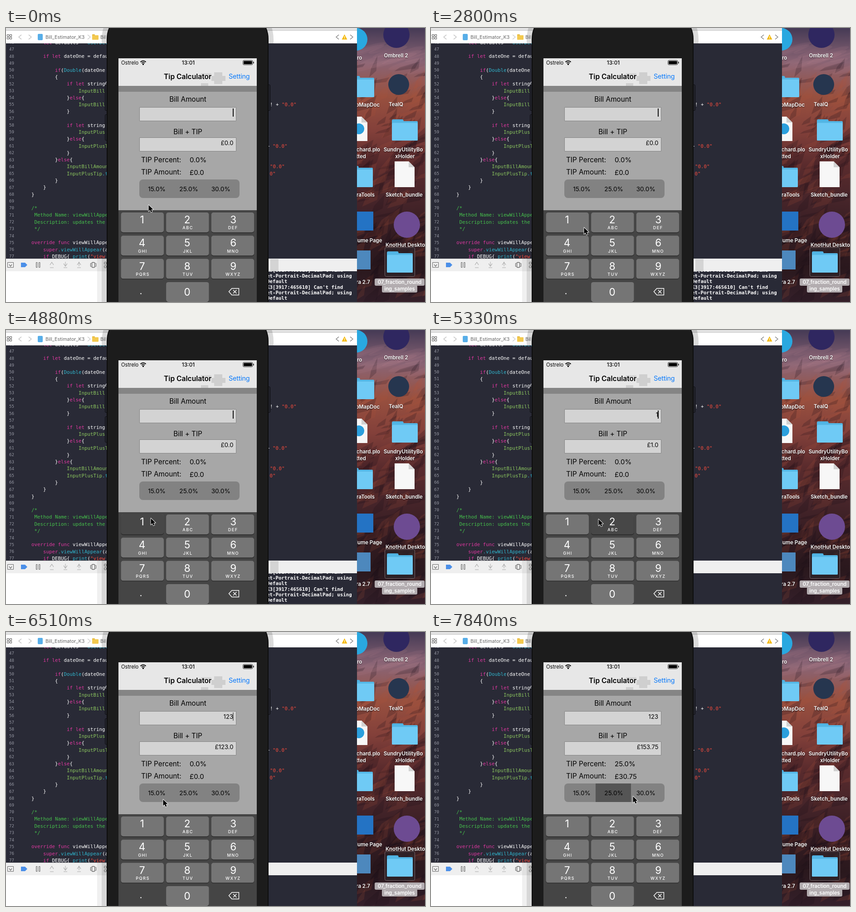
Write an HTML page with a canvas that moves like this. It is 924 px wide and 606 px high and loops after 7.99 s.

```html
<!DOCTYPE html>
<html lang="en">
<head>
<meta charset="utf-8">
<title>Tip calculator demo</title>
<style>
html, body { margin: 0; width: 100%; height: 100%; overflow: hidden; background: #292a36; }
canvas { display: block; width: 924px; height: 606px; }
</style>
</head>
<body>
<canvas id="stage" width="924" height="606"></canvas>
<script>
const W = 924, H = 606, LOOP = 7990, STEPS = 54;
const SANS = 'Inter, "Liberation Sans", sans-serif';
const MONO = '"DejaVu Sans Mono", monospace';
const stage = document.getElementById('stage').getContext('2d');
const backdrop = document.createElement('canvas');
backdrop.width = W;
backdrop.height = H;
let c = backdrop.getContext('2d');

let seed = 11;
const random = () => (seed = seed * 16807 % 2147483647) / 2147483647;

function box(x, y, w, h, fill, r = 0) {
  c.fillStyle = fill;
  c.beginPath();
  c.roundRect(x, y, w, h, r);
  c.fill();
}

function frame(x, y, w, h, color, width = 1, r = 0) {
  c.strokeStyle = color;
  c.lineWidth = width;
  c.beginPath();
  c.roundRect(x, y, w, h, r);
  c.stroke();
}

function disc(x, y, r, fill) {
  c.fillStyle = fill;
  c.beginPath();
  c.arc(x, y, r, 0, 7);
  c.fill();
}

function trace(points, closed) {
  c.beginPath();
  for (let i = 0; i < points.length; i += 2) c.lineTo(points[i], points[i + 1]);
  if (closed) c.closePath();
}

function poly(points, fill) {
  trace(points, true);
  c.fillStyle = fill;
  c.fill();
}

function line(points, color, width = 1, closed = false) {
  trace(points, closed);
  c.strokeStyle = color;
  c.lineWidth = width;
  c.stroke();
}

// y is the middle of the capital letters
function text(s, x, y, size, color = '#000', o = {}) {
  c.font = `${o.weight || 400} ${size}px ${o.font || SANS}`;
  c.letterSpacing = (o.gap || 0) + 'px';
  c.textAlign = o.align || 'left';
  c.fillStyle = color;
  c.fillText(s, x, y + size * 0.363);
}

function within(x, y, w, h, draw) {
  c.save();
  c.beginPath();
  c.rect(x, y, w, h);
  c.clip();
  draw();
  c.restore();
}

// ---------- code editor ----------
const PINK = '#de38a0', GREEN = '#8cc75f', RED = '#f64c3e', TEAL = '#30b4cc';
const rules = [
  [/^(if|let|else|override|func|super)\b/, PINK],
  [/^Input\w*/, GREEN],
  [/^"[^"]*"?/, RED],
  [/^(Double|print|UserDefaults)\b/, TEAL],
  [/^\.(viewWillAppear|t)\b/, TEAL],
  [/^\w+/, '#fff'],
  [/^\W/, '#fff']
];
const source = `    let defaults = UserDefaults

    if let dateOne = defaults

        if(Double(dateOne
        {
            if let stringOne
                InputBillAmount
            }else{
                InputBillAmount
            }

            if let stringTwo
                InputPlusTip
            }else{
                InputPlusTip
            }
        }else{
            InputBillAmount
            InputPlusTip.t
        }
    }
}

/*
 Method Name: viewWillAppear
 Description: updates the
 */

override func viewWillAppear
    super.viewWillAppear(a
    if DEBUG{ print("view`.split('\n');

const lineY = i => 31.7 + i * 15.27;

function code(s, x, y) {
  while (s) {
    const [re, color] = rules.find(r => r[0].test(s));
    const part = s.match(re)[0];
    text(part, x, y, 10.8, color, { font: MONO });
    x += part.length * 6.5;
    s = s.slice(part.length);
  }
}

function chevron(x, y, dx, dy, color, size = 5) {
  const sx = dy ? size : 0, sy = dx ? size : 0;
  line([x - sx - dx * 3, y - sy - dy * 3, x + dx * 3, y + dy * 3,
    x + sx - dx * 3, y + sy - dy * 3], color, 1.2);
}

function pathBar() {
  box(0, 0, 774, 6, '#e3e3e3');
  box(0, 5, 774, 1, '#c6c6c6');
  box(0, 6, 774, 28, '#fff');
  for (let n = 0; n < 4; n++) frame(2.5 + n % 2 * 6, 14.5 + (n >> 1) * 6, 4, 4, '#555');
  chevron(31, 20, -1, 0, '#bbb');
  chevron(53, 20, 1, 0, '#bbb');
  box(70, 13, 11, 14, '#58aee8', 2);
  text('Bill_Estimator_K3', 87, 20, 10.7, '#666');
  chevron(183, 20, 1, 0, '#c8c8c8');
  box(190, 14, 6, 4, '#e5b93c', 1);
  box(190, 16, 14, 10, '#f3c94f', 1);
  text('Bil', 208, 20, 10.7, '#666');
  chevron(731, 20, -1, 0, '#777');
  chevron(762, 20, 1, 0, '#777');
  poly([746.5, 14, 752.5, 25.5, 740.5, 25.5], '#f4b90b');
  text('!', 746.5, 21.5, 8, '#fff', { weight: 700, align: 'center' });
}

function debugBar() {
  const ink = '#666', pale = '#aaa';
  box(0, 510, 774, 28, '#efefef');
  box(0, 510, 579, 1, '#cfcfcf');
  box(0, 538, 222, 68, '#fff');
  frame(3.5, 518.5, 13, 11, ink);
  chevron(10, 525, 0, .7, ink, 3);
  poly([33, 519, 42, 519, 47, 524, 42, 529, 33, 529], '#4b8fe8');
  for (const x of [66, 72]) frame(x + .5, 518.5, 2.5, 11, ink);
  for (let n = 0; n < 3; n++) {
    const x = 101 + n * 30, up = n === 1 ? 1 : -1;
    chevron(x, up > 0 ? 524 : 521, 0, up, pale, 4);
    if (n) line([x, 517, x, 527], pale);
    line([x - 4, 530, x + 4, 530], pale);
  }
  frame(189.5, 518.5, 6, 11, ink, 1.3, 1);
  for (const d of [-1, 1]) {
    line([192.5 + d * 4.5, 520, 192.5 + d * 6, 521, 192.5 + d * 6, 527, 192.5 + d * 4.5, 528], ink, 1.2);
    frame(216.5, 521.5 + d * 4, 5, 5, ink, 1, 2.5);
  }
}

function editor() {
  box(0, 0, 774, H, '#292a36');
  within(0, 34, 774, 476, () => {
    let comment = false;
    source.forEach((s, i) => {
      text(46 + i, 7, lineY(i), 9, '#9698a3', { font: MONO });
      if (s.startsWith('/*')) comment = true;
      if (comment) text(s, 56, lineY(i), 10.8, '#46c04c', { font: MONO });
      else code(s, 56, lineY(i));
      if (s.endsWith('*/')) comment = false;
    });
    code('! + "0.0"', 582, lineY(9));
    code('+ "0.0"', 575, lineY(15));
    code('"0.0"', 582, lineY(18));
    text('.0"', 575, lineY(19), 10.8, RED, { font: MONO });
  });
  pathBar();
  debugBar();
}

// ---------- desktop ----------
function wallpaper() {
  const tones = ['#453a55', '#8a6474', '#98503f', '#83403a', '#5a2b2d', '#47252a', '#341c22', '#2a181d', '#35202a'];
  const sky = c.createLinearGradient(0, 0, 0, H);
  tones.forEach((tone, i) => sky.addColorStop(i / (tones.length - 1), tone));
  box(774, 0, 150, H, sky);
  // slanted rock facets, lit or shaded
  for (let n = 0; n < 170; n++) {
    const x = 764 + random() * 165, y = 80 + random() * 520;
    const w = 12 + random() * 30, h = 5 + random() * 16;
    const fill = random() < .45 ? 'rgba(176,84,60,.16)' : 'rgba(22,12,22,.2)';
    poly([x, y, x + w, y - h * 1.4, x + w * .8, y + h * .3, x - w * .3, y + h], fill);
  }
  // soft clouds
  for (let n = 0; n < 14; n++) {
    c.fillStyle = 'rgba(190,140,150,.1)';
    c.beginPath();
    c.ellipse(774 + random() * 150, 35 + random() * 55, 40, 6, -.3, 0, 7);
    c.fill();
  }
}

function label(s, x, y, align = 'center') {
  c.shadowColor = 'rgba(0,0,0,.7)';
  c.shadowBlur = 2;
  c.shadowOffsetY = 1;
  text(s, x, y, 11.4, '#fff', { weight: 600, align });
  c.shadowColor = 'transparent';
}

function folder(x, y, w = 57, h = 47) {
  box(x, y, w * .45, 10, '#4fb2e2', 3);
  box(x, y + 4, w, h - 4, '#54b7e6', 2);
  box(x, y + 8, w, h - 8, '#6fcaf5', 2);
}

function sheet(x, y, w, h) {
  poly([x, y, x + w - 13, y, x + w, y + 13, x + w, y + h, x, y + h], '#f7f7f7');
  poly([x + w - 13, y, x + w, y + 13, x + w - 13, y + 13], '#d2d2d2');
}

function desktop() {
  within(774, 0, 150, H, () => {
    wallpaper();
    disc(772, 25, 25, '#29a8e0');
    label('ro', 774, 66, 'left');
    disc(861, 15, 29, '#2f2760');
    label('Ombrell 2', 860, 61);
    folder(755, 106);
    label('pMapDoc', 771, 170, 'left');
    disc(866, 125, 23, '#26364f');
    label('TealQ', 860, 169);
    sheet(755, 196, 42, 54);
    disc(778, 223, 12, '#2b9fdd');
    label('rchard.plo', 825, 269, 'right');
    label('tted', 783, 284);
    folder(851, 202);
    label('SundryUtilityBo', 876, 269);
    label('xHolder', 880, 284);
    folder(752, 305);
    label('raTools', 773, 369, 'left');
    sheet(857, 295, 44, 57);
    label('Sketch_bundle', 878, 369);
    box(768, 406, 42, 42, '#2473c4');
    label('lume Page', 772, 470, 'left');
    disc(884, 435, 29, '#6d4b92');
    label('KnotHut Desktop', 837, 480, 'left');
    box(762, 492, 42, 42, '#4d88bd');
    label('ra 2.7', 772, 562, 'left');
    box(835, 485, 67, 65, 'rgba(45,35,40,.75)', 3);
    frame(835.5, 485.5, 66, 64, '#77686d', 1, 3);
    folder(840, 494);
    box(813, 554, 110, 16, '#b3adb0', 3);
    box(829, 569, 78, 16, '#b3adb0', 3);
    const o = { weight: 600, align: 'center' };
    text('07_fraction_round', 868, 562, 11.2, '#fff', o);
    text('ing_samples', 868, 577, 11.2, '#fff', o);
  });
}

// ---------- phone ----------
function phoneBody() {
  within(0, 0, 774, 34, () => box(211, -60, 379, 200, 'rgba(0,0,0,.14)', 85));
  box(201, 510, 21, 96, 'rgba(0,0,0,.06)');
  box(211, 510, 11, 96, 'rgba(0,0,0,.1)');
  for (const [x, y] of [[218.5, 125.5], [218.5, 191.5], [576.5, 125.5]]) {
    box(x, y, 6, 57, '#23242c', 2);
    frame(x, y, 6, 57, '#0c0c10', 1, 2);
  }
  box(222, -38, 357, 760, '#0d0d0d', 62);
  box(224, -36, 353, 756, '#1c1c1c', 60);
}

function statusBar() {
  text('Ostrelo', 254, 76.5, 11.2);
  c.lineWidth = 2;
  c.strokeStyle = '#000';
  for (const r of [5, 8.7]) {
    c.beginPath();
    c.arc(302.5, 81.5, r, -2.33, -.81);
    c.stroke();
  }
  disc(302.5, 80.2, 1.7, '#000');
  text('13:01', 402, 76.5, 11.8, '#000', { weight: 500, align: 'center' });
  frame(522.5, 71.5, 21.5, 10, '#333', 1, 2.5);
  box(524, 73, 18.5, 7, '#000', 1);
  box(545, 74.5, 1.8, 4, '#333', 1);
}

function screen() {
  box(248, 67, 305, 539, '#a7a7a7');
  box(248, 67, 305, 61, '#e7e7e7');
  box(248, 128, 305, 13, '#858585');
  box(459, 98, 18, 26, '#cfcfcf');
  box(453, 106, 31, 11, '#cfcfcf');
  box(430, 100, 23, 5, '#d5d5d5');
  box(430, 122, 16, 6, '#cfcfcf');
  statusBar();
  text('Tip Calculator', 348, 107, 15.6, '#000', { weight: 600 });
  text('Setting', 491, 107, 14.4, '#0b7bfb', { gap: -.2 });
  const mid = { align: 'center' };
  text('Bill Amount', 401, 157, 15.3, '#000', mid);
  text('Bill + TIP', 401, 229, 15.3, '#000', mid);
  text('TIP Percent:', 298, 291, 15.3);
  text('TIP Amount:', 298, 318, 15.3);
  for (const y of [175, 242]) {
    box(294, y, 214, 31, '#d3d3d3');
    frame(294.5, y + .5, 213, 30, '#838383');
  }
}

const letters = 'ABC DEF GHI JKL MNO PQRS TUV WXYZ'.split(' ');

function key(n, down) {
  const col = n ? (n - 1) % 3 : 1, row = n ? Math.floor((n - 1) / 3) : 3;
  const x = 253.5 + col * 99.6, y = 408 + row * 51.3;
  box(x, y + 1, 94.5, 44.5, '#2b2b2b', 5);
  box(x, y, 94.5, 44, down ? '#474747' : '#757575', 5);
  text(n, x + 46.5 + (col === 2 ? 2 : 0), y + 16 + (n ? 0 : 5.5), 22.5, '#fff', { align: 'center' });
  if (n > 1) text(letters[n - 2], x + 48, y + 34, 9.2, '#fff', { align: 'center', weight: 500, gap: 1.4 });
}

function keypad() {
  box(248, 403, 305, 203, '#454545');
  for (let n = 0; n < 10; n++) key(n, false);
  disc(297.5, 587.5, 1.3, '#fff');
  line([491.5, 583, 498, 576, 513.5, 576, 513.5, 590.5, 498, 590.5], '#fff', 1.4, true);
  for (const d of [-1, 1]) line([504.7 - d * 3.7, 579.5, 504.7 + d * 3.7, 587], '#fff', 1.4);
}

editor();
desktop();
phoneBody();
screen();
keypad();

// ---------- moving parts ----------
c = stage;

// steps at which a digit appears, and at which a tip is picked
const typed = [34, 37, 40], picked = [45, 51];
const rates = [0, 15, 25];
const count = (list, i) => list.filter(s => s <= i).length;

// pointer moves: first step, last step, goal
const moves = [
  [3, 6, 273, 333], [14, 19, 337, 441], [19, 23, 311, 390], [23, 29, 317, 411], [30, 33, 319, 416],
  [34, 39, 460, 421], [41, 45, 325, 360], [46, 48, 373, 363], [48, 53, 445, 363]
];

function pointerAt(i) {
  let x = 314, y = 391;
  for (const [from, to, gx, gy] of moves) {
    const k = Math.min(1, Math.max(0, (i - from) / (to - from)));
    const ease = k * k * (3 - 2 * k);
    x += (gx - x) * ease;
    y += (gy - y) * ease;
  }
  return [Math.round(x), Math.round(y)];
}

function pointer(x, y) {
  c.save();
  c.translate(x + .5, y + .5);
  const arrow = [0, 0, 0, 14, 3.2, 11, 5.4, 16, 8, 15, 5.8, 10, 10.2, 10];
  c.lineJoin = 'round';
  line(arrow, '#fff', 1.8, true);
  poly(arrow, '#000');
  c.restore();
}

// one blink a second: fade out, dark, fade in, lit; lit while typing
function caretAlpha(i) {
  const last = typed[2] + 4;
  if (i >= typed[0] - 1 && i < last) return 1;
  const p = (i - (i < last ? .75 : last) + 6.8) % 6.8;
  return p >= 4 ? 1 : p >= 1 && p < 3 ? 0 : .5;
}

function consoleLog() {
  box(583, 511, 18, 27, '#d4d4d4');
  within(579, 538, 195, 68, () => {
    const log = ["K3[3917:465610] Can't find", 'et-Portrait-DecimalPad; using', 'Default'];
    for (let i = 0; i < 6; i++) {
      text(log[i % 3], 575, 535.5 + i * 12.4, 10.75, '#fff', { font: MONO, weight: 700 });
    }
  });
}

function segments(chosen) {
  box(294, 335, 221, 41, '#828282', 8);
  if (chosen === 1) box(294, 335, 69, 41, '#555', [8, 0, 0, 8]);
  if (chosen === 2) box(363, 335, 78, 41, '#555');
  ['15.0%', '25.0%', '30.0%'].forEach((s, n) =>
    text(s, 332.5 + n * 70.6, 356, 13.6, '#000', { align: 'center' }));
}

const money = v => '£' + v.toFixed(Number.isInteger(v) ? 1 : 2);

function draw(i) {
  c.drawImage(backdrop, 0, 0);
  if (i < typed[0]) consoleLog();

  const bill = '123'.slice(0, count(typed, i));
  const chosen = count(picked, i);
  const rate = rates[chosen], tip = bill * rate / 100;
  const right = { align: 'right' };
  text(bill, 501, 187, 13.1, '#000', right);
  text(money(+bill + tip), 501.5, 254, 13.1, '#000', right);
  text(rate.toFixed(1) + '%', 405, 292, 15);
  text(money(tip), 405, 319.5, 15);
  segments(chosen);

  const pressed = typed.indexOf(i + 1) + 1;
  if (pressed) key(pressed, true);
  c.globalAlpha = caretAlpha(i);
  box(500, 178, 2, 18, '#111');
  c.globalAlpha = 1;
  pointer(...pointerAt(i));
}

let shown = -1;
function tick() {
  const t = performance.now() % LOOP;
  const i = Math.min(STEPS - 1, Math.floor((t + 15) / LOOP * STEPS));
  if (i !== shown) draw(shown = i);
  requestAnimationFrame(tick);
}
tick();
</script>
</body>
</html>
```
